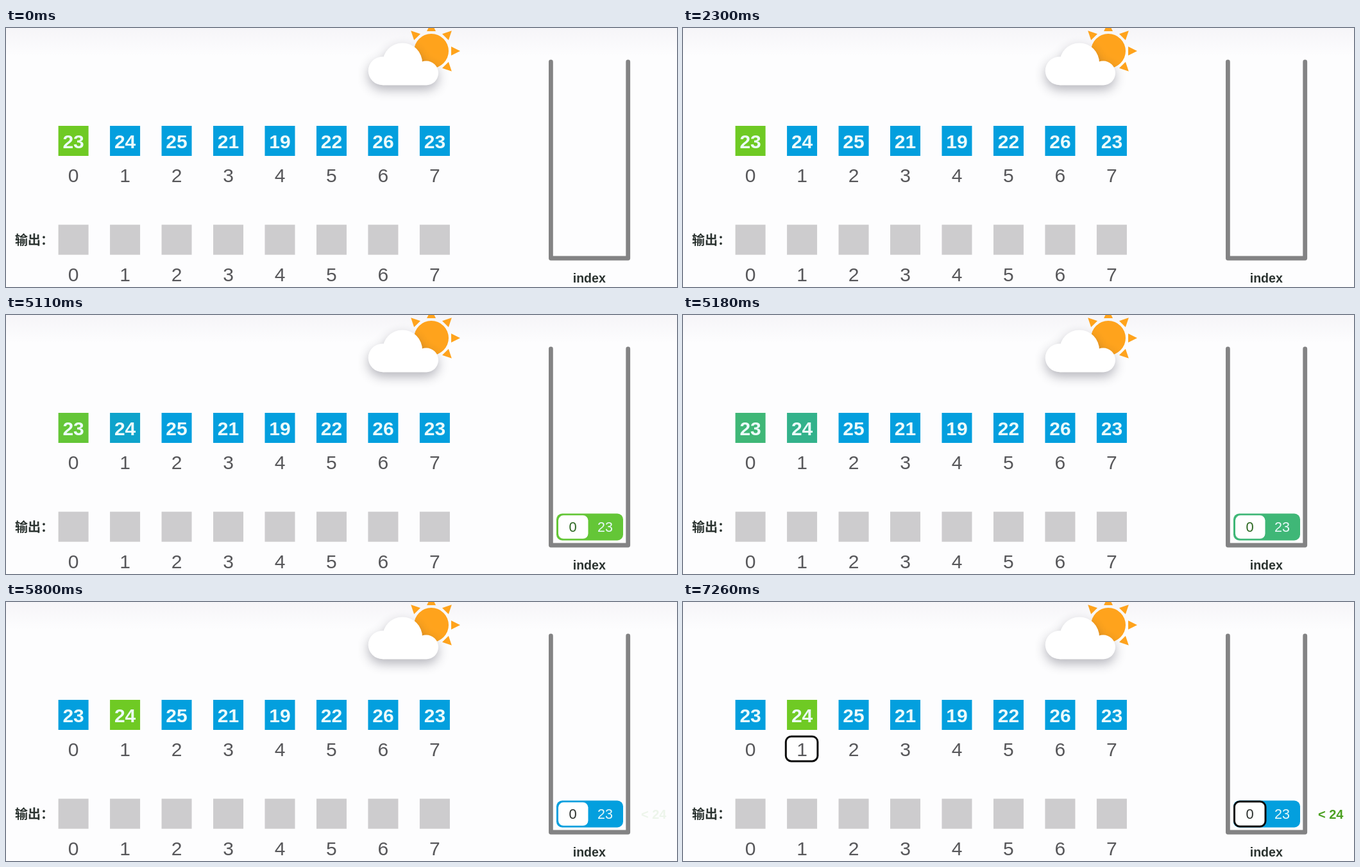
Write an HTML page with a canvas that moves like this. It is 1046 by 405 pixels and loops after 8000 ms.

```html
<!DOCTYPE html>
<html lang="zh-CN">
<head>
<meta charset="utf-8">
<title>Daily temperatures: monotonic stack</title>
<style>
  html, body { margin: 0; width: 100%; height: 100%; overflow: hidden; background: #fdfdfe; }
  canvas { display: block; width: 1046px; height: 405px; }
</style>
</head>
<body>
<canvas id="stage" width="1046" height="405"></canvas>
<script>
const LOOP = 8000;
const W = 1046, H = 405;
const BLUE = [3, 159, 222], GREEN = [111, 202, 36];
const SANS = '"Liberation Sans", Arial, sans-serif';
const CJK = '"Noto Sans CJK SC", "Noto Sans CJK", sans-serif';
const temps = [23, 24, 25, 21, 19, 22, 26, 23];
const CELL = 47;

const canvas = document.getElementById('stage');
const ctx = canvas.getContext('2d');
const ratio = window.devicePixelRatio || 1;
canvas.width = W * ratio;
canvas.height = H * ratio;

const ramp = (t, from, to) => Math.min(1, Math.max(0, (t - from) / (to - from)));
const smooth = p => p * p * (3 - 2 * p);
const mix = (a, b, p) => `rgb(${a.map((v, i) => Math.round(v + (b[i] - v) * p)).join(',')})`;
const cellX = i => 81.6 + 80.47 * i;

function text(str, x, y, size, color, weight = 400, align = 'center', family = SANS) {
  ctx.font = `${weight} ${size}px ${family}`;
  ctx.textAlign = align;
  ctx.fillStyle = color;
  ctx.fillText(str, x, y);
}

function roundRect(x, y, w, h, r) {
  ctx.beginPath();
  ctx.roundRect(x, y, w, h, r);
}

function fillRound(x, y, w, h, r, color) {
  roundRect(x, y, w, h, r);
  ctx.fillStyle = color;
  ctx.fill();
}

function marker(x, y, w, h) {
  roundRect(x, y, w, h, 8.5);
  ctx.fillStyle = '#fff';
  ctx.fill();
  ctx.strokeStyle = '#0b0b0b';
  ctx.lineWidth = 3;
  ctx.stroke();
}

function background() {
  ctx.fillStyle = '#fdfdfe';
  ctx.fillRect(0, 0, W, H);
  const g = ctx.createLinearGradient(0, 0, 0, 44);
  g.addColorStop(0, '#f6f5f8');
  g.addColorStop(1, '#fdfdfe');
  ctx.fillStyle = g;
  ctx.fillRect(0, 0, W, 44);
}

function sun(x, y) {
  ctx.save();
  ctx.translate(x, y);
  ctx.fillStyle = '#ffa31c';
  for (let i = 0; i < 8; i++) {
    ctx.rotate(Math.PI / 4);
    ctx.beginPath();
    ctx.moveTo(45, 0);
    ctx.lineTo(31, -7);
    ctx.lineTo(31, 7);
    ctx.fill();
  }
  ctx.beginPath();
  ctx.arc(0, 0, 27, 0, Math.PI * 2);
  ctx.fill();
  ctx.restore();
}

function cloud() {
  const puffs = [[587, 67, 22.3], [618, 54.5, 31], [655, 70.5, 19]];
  ctx.save();
  ctx.beginPath();
  for (const [x, y, r] of puffs) {
    ctx.moveTo(x + r, y);
    ctx.arc(x, y, r, 0, Math.PI * 2);
  }
  ctx.rect(587, 58, 68, 31.4);
  ctx.shadowColor = 'rgba(40, 40, 60, 0.34)';
  ctx.shadowBlur = 17 * ratio;
  ctx.shadowOffsetY = 7 * ratio;
  ctx.fillStyle = '#fff';
  ctx.fill();
  ctx.restore();
}

function rows(step) {
  const fills = [mix(GREEN, BLUE, step), mix(BLUE, GREEN, step)];
  temps.forEach((temp, i) => {
    const x = cellX(i), mid = x + CELL / 2;
    ctx.fillStyle = fills[i] || mix(BLUE, BLUE, 0);
    ctx.fillRect(x, 153, CELL, CELL);
    text(temp, mid, 187.5, 30, '#ecfbfb', 700);
    text(i, mid, 241.3, 30, '#57575a');
    ctx.fillStyle = '#cdccce';
    ctx.fillRect(x, 307.6, CELL, CELL);
    text(i, mid, 396, 30, '#57575a');
  });
  text('输出：', 14, 338.5, 20, '#2b3330', 700, 'left', CJK);
}

function stack() {
  ctx.beginPath();
  ctx.moveTo(849.4, 53);
  ctx.lineTo(849.4, 360);
  ctx.lineTo(969.7, 360);
  ctx.lineTo(969.7, 53);
  ctx.strokeStyle = '#838384';
  ctx.lineWidth = 6.8;
  ctx.lineCap = ctx.lineJoin = 'round';
  ctx.stroke();
  text('index', 909.3, 398, 19.6, '#2b3330', 700);
}

function entry(alpha, step, t) {
  ctx.globalAlpha = alpha;
  fillRound(858, 310.5, 104, 42, 9, mix(GREEN, BLUE, step));
  if (t >= 7260) marker(859.5, 312, 48.5, 39);
  else fillRound(861, 313.3, 46.5, 36.5, 8, '#fff');
  text('0', 883.6, 339.3, 22, t < 5800 ? '#2f6a24' : '#2e3330');
  text('23', 934, 339.3, 21.5, '#e6f8f8');
  ctx.globalAlpha = 1;
}

function draw(t) {
  const pushed = smooth(ramp(t, 2450, 2790));
  const step = smooth(ramp(t, 5060, 5320));
  const compare = smooth(ramp(t, 5740, 6080));

  ctx.setTransform(ratio, 0, 0, ratio, 0, 0);
  background();
  sun(663, 36);
  cloud();
  rows(step);
  stack();
  if (pushed > 0) entry(pushed, step, t);
  if (compare > 0) {
    ctx.globalAlpha = compare;
    text('< 24', 990, 339, 20, '#4ba021', 700, 'left');
    ctx.globalAlpha = 1;
  }
  if (t >= 6340) {
    marker(160.3, 210.3, 49.6, 38.6);
    text('1', cellX(1) + CELL / 2, 241.3, 30, '#57575a');
  }
}

const start = performance.now();
function frame() {
  draw((performance.now() - start) % LOOP);
  requestAnimationFrame(frame);
}
frame();
</script>
</body>
</html>
```
